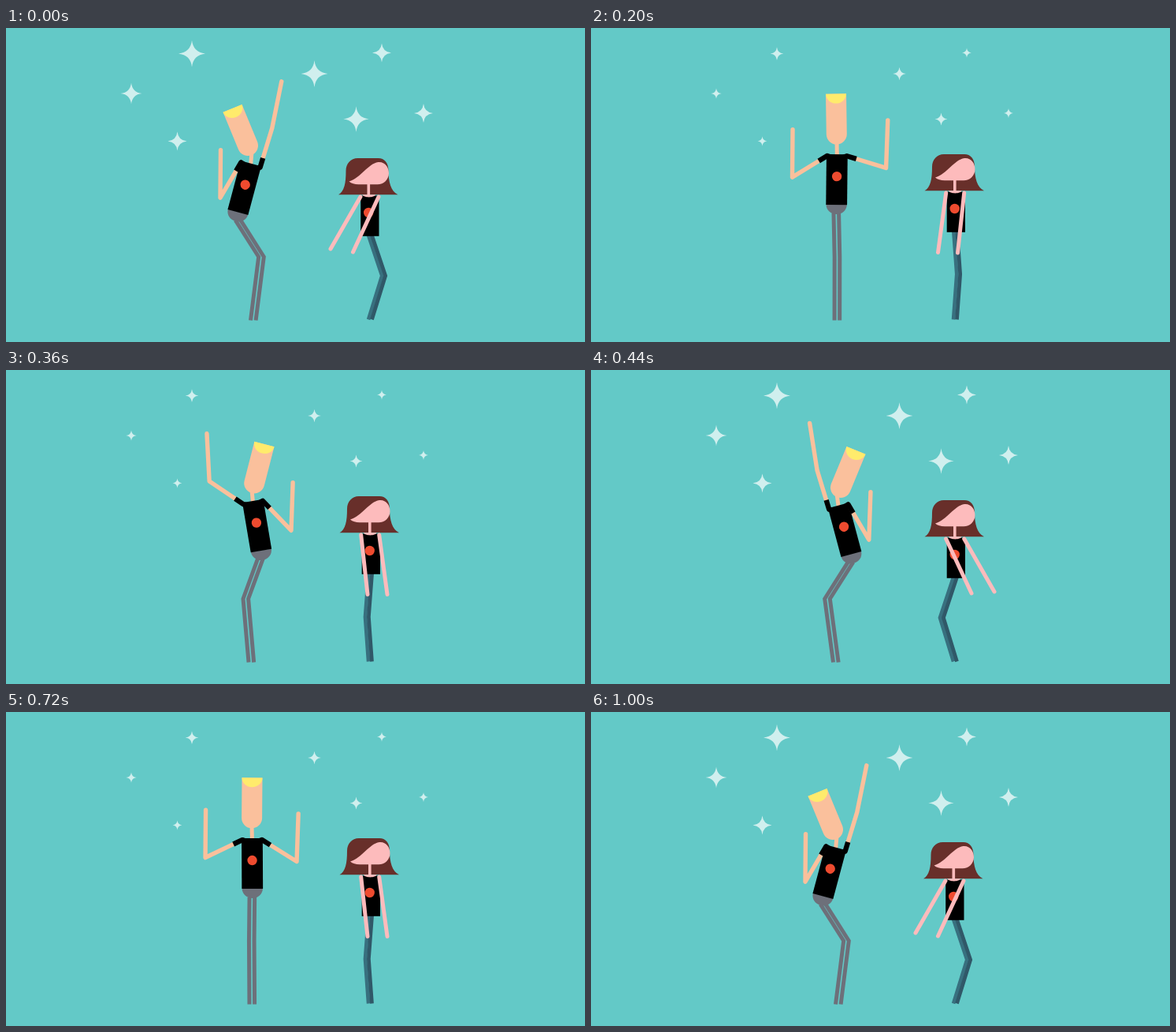
These frames come from a looping animation (735 by 398 pixels, 1040 ms). An HTML page:

```html
<!DOCTYPE html>
<html lang="en">
<head>
<meta charset="utf-8">
<title>Dancing pair</title>
<style>
  html, body { margin: 0; width: 100%; height: 100%; overflow: hidden; background: #63c9c7; }
  svg { display: block; width: 100%; height: 100%; }
  .line { fill: none; stroke-linejoin: round; }
  .skin { stroke: #fac09c; stroke-width: 5.4; stroke-linecap: round; }
  .sleeve { stroke: #000; stroke-width: 6.4; }
  .trouser { stroke: #6d707a; stroke-width: 5; stroke-linejoin: miter; }
  .pink { stroke: #fdbbbc; stroke-width: 5; stroke-linecap: round; }
  .jeans { stroke-width: 4.7; stroke-linejoin: miter; }
</style>
</head>
<body>
<svg viewBox="0 0 735 398">
  <g id="stars" fill="#d0efee"></g>

  <g id="man">
    <polyline id="legL" class="line trouser"/>
    <polyline id="legR" class="line trouser"/>
    <line id="neck" stroke="#fac09c" stroke-width="5"/>
    <!-- torso: origin at the middle of the shirt hem -->
    <g id="torso">
      <path d="M-13.2-.5H13.2C13 7 7 12 0 12S-13 7-13.2-.5Z" fill="#6d707a"/>
      <rect x="-13.4" y="-64" width="26.8" height="64"/>
      <circle cy="-36" r="6.2" fill="#ee4b2f"/>
    </g>
    <!-- head: origin at the chin -->
    <g id="head">
      <path d="M-13-64H13V-13A13 13 0 0 1-13-13Z" fill="#fac09c"/>
      <path d="M-13-64H13A13 12 0 0 1-13-64Z" fill="#ffeb6c"/>
    </g>
    <polyline id="armL" class="line skin"/>
    <polyline id="armR" class="line skin"/>
    <polyline id="sleeveL" class="line sleeve"/>
    <polyline id="sleeveR" class="line sleeve"/>
  </g>

  <g id="woman">
    <polyline id="jeanL" class="line jeans" stroke="#38707f"/>
    <polyline id="jeanR" class="line jeans" stroke="#305868"/>
    <g id="bust">
      <path d="M448 160H474C482 160 487 166 487 176C487 190 490 202 499 206.3H423.500C431 202 433 192 433 176C433 167 439 160 448 160Z" fill="#682f2a"/>
      <path d="M437 189.500C452 185 461 167 474 165C482 164 487.500 171 487.500 179C487.500 187 481 193.300 473 193.300H449C444 193.300 440 192 437 189.500Z" fill="#fdbbbc"/>
      <rect x="451.700" y="207.500" width="23.300" height="51.300"/>
      <path d="M454 206.300H470.500C469 210.500 455.500 210.500 454 206.300Z" fill="#fdbbbc"/>
      <rect x="460" y="192" width="3.600" height="16" fill="#fdbbbc"/>
      <circle cx="461.700" cy="229" r="6.200" fill="#ee4b2f"/>
    </g>
    <polyline id="limbL" class="line pink"/>
    <polyline id="limbR" class="line pink"/>
  </g>
</svg>
<script>
const $ = id => document.getElementById(id);
const LOOP = 1040, STEP = 40, RAD = Math.PI / 180;

// Keys for the man's lean (1 = left, -1 = right) and upper-arm angles from vertical
const times = [0, 200, 360, 440, 520, 720, 880, 1000, 1040];
const lean = [1, .04, -.64, -1, -1, -.02, .64, 1, 1];
const rightArm = [17, 107, 136, 149.5, 149.5, 122, 56, 17, 17];
const leftArm = [149.5, 121.5, 56, 17, 17, 115.6, 137, 149.5, 149.5];

// The woman snaps between four poses: bust offset, knee, hands
const poses = {
  left:      { at: [-1.5, 5], knee: [479.5, 314], handL: [412, 280], handR: [440.5, 284] },
  restLeft:  { at: [0, 0], knee: [466.5, 312], handL: [440.5, 284.5], handR: [465.5, 285] },
  restRight: { at: [0, 0], knee: [458.2, 313], handL: [459, 284.5], handR: [484, 284.5] },
  right:     { at: [0, 5], knee: [445.2, 314], handL: [483, 283], handR: [512, 281] }
};

// x, y, radius
const stars = [
  [236, 32.5, 17], [159, 83, 13.5], [217.5, 143.5, 12], [391.5, 58, 17],
  [444.5, 115.5, 16.2], [477, 31.5, 12], [530, 108, 12]
].map(([x, y, r]) => {
  const el = document.createElementNS("http://www.w3.org/2000/svg", "path");
  el.setAttribute("d", "M0-1Q.1-.1 1 0Q.1 .1 0 1Q-.1 .1-1 0Q-.1-.1 0-1Z");
  $("stars").append(el);
  return { el, x, y, r };
});

function track(keys, t) {
  let i = 1;
  while (times[i] <= t) i++;
  const k = (t - times[i - 1]) / (times[i] - times[i - 1]);
  return keys[i - 1] + (keys[i] - keys[i - 1]) * k;
}

const setLine = (id, ...points) => $(id).setAttribute("points", points.join(" "));
const place = (id, x, y, turn = 0) =>
  $(id).setAttribute("transform", `translate(${x} ${y}) rotate(${turn})`);
const polar = ([x, y], deg, length) =>
  [x + Math.sin(deg * RAD) * length, y - Math.cos(deg * RAD) * length];

function drawArm(name, side, angle, toStage) {
  const shoulder = toStage(side * 12.5, -62);
  const bend = Math.max(0, (117 - angle) / 100);
  const fore = (side > 0 ? 2 : .5) + side * 9.5 * bend * bend;
  const elbow = polar(shoulder, side * angle, 52);
  setLine("arm" + name, shoulder, elbow, polar(elbow, fore, 60.5));
  setLine("sleeve" + name, toStage(side * 7, -60), shoulder, polar(shoulder, side * angle, 12.5));
}

function drawMan(t, s) {
  const turn = 15 * s, c = Math.cos(turn * RAD), n = Math.sin(turn * RAD);
  const hem = [312.4 - 18 * s, 224 + 9.5 * Math.abs(s) ** 1.4];
  const toStage = (x, y) => [hem[0] + x * c - y * n, hem[1] + x * n + y * c];
  const chin = [312, 147 + 14 * Math.abs(s)];

  const hip = [312 - 17.5 * s, 290 - Math.sqrt(55 ** 2 - (29.5 * s) ** 2)];
  const knee = [312 + 12 * s, 290], foot = [312.3 + 1.5 * s, 370.5];
  for (const [name, dx] of [["L", -3.3], ["R", 3.3]])
    setLine("leg" + name, ...[hip, knee, foot].map(([x, y]) => [x + dx, y]));

  place("torso", ...hem, turn);
  place("head", ...chin, -22.5 * s);
  const collar = toStage(0, -63);
  const ends = { x1: chin[0], y1: chin[1] - 4, x2: collar[0], y2: collar[1] };
  for (const k in ends) $("neck").setAttribute(k, ends[k]);

  drawArm("R", 1, track(rightArm, t), toStage);
  drawArm("L", -1, track(leftArm, t), toStage);
}

function drawWoman(pose) {
  const [dx, dy] = pose.at;
  place("bust", dx, dy);
  const waist = [462.5 + dx / 3, 257 + dy], foot = [462.3, 369.5];
  for (const [name, off] of [["L", -2.2], ["R", 2.2]])
    setLine("jean" + name, ...[waist, pose.knee, foot].map(([x, y]) => [x + off, y]));
  setLine("limbL", [450.7 + dx / 2, 209 + dy], pose.handL);
  setLine("limbR", [473.7 + dx / 2, 209 + dy], pose.handR);
}

function draw(t) {
  const s = track(lean, t), accent = Math.abs(s) > .9;
  drawMan(t, s);
  drawWoman(accent ? (s > 0 ? poses.left : poses.right)
                   : (s > 0 ? poses.restLeft : poses.restRight));
  for (const { el, x, y, r } of stars)
    el.setAttribute("transform", `translate(${x} ${y}) scale(${accent ? r : r * .49})`);
}

let start;
function tick(now) {
  start ??= now;
  draw(Math.floor(((now - start) % LOOP) / STEP) * STEP);
  requestAnimationFrame(tick);
}
draw(0);
requestAnimationFrame(tick);
</script>
</body>
</html>
```
